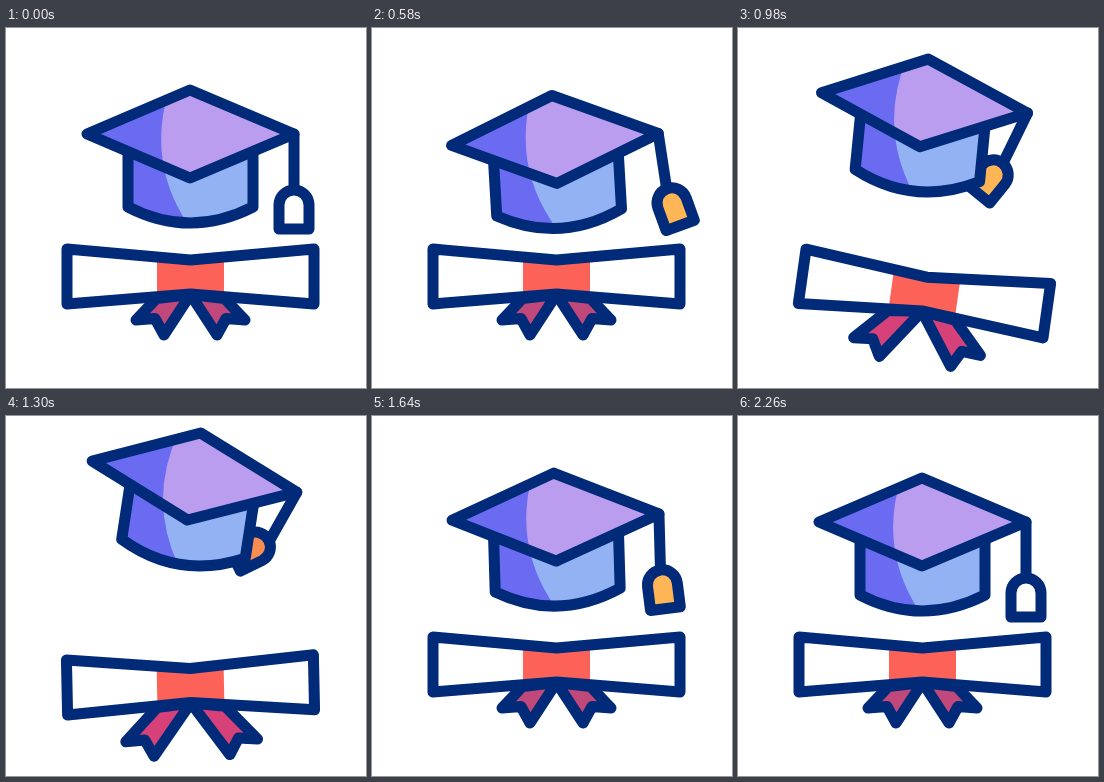
Recreate the animation shown at these times as an HTML page. Size 360x360 px, loop 2.4 s.

```html
<!DOCTYPE html>
<html lang="en">
<head>
<meta charset="utf-8">
<title>Graduation cap and diploma</title>
<style>
  html, body { margin: 0; width: 100%; height: 100%; overflow: hidden; background: #fff; }
  svg { display: block; width: 100vw; height: 100vh; }
  .line { fill: none; stroke: #012a78; stroke-width: 11; stroke-linejoin: round; stroke-linecap: round; }
</style>
</head>
<body>
<svg viewBox="0 0 360 360">
  <defs>
    <path id="board" d="M81 106L184 62L288 106L184 150Z"/>
    <path id="body" d="M122 122V179Q184 211 247 179V122Z"/>
    <path id="paper" d="M-123.5 -27.5L0 -16.5L123.5 -27.5V27.5L0 17.5L-123.5 27.5Z"/>
    <path id="shade" d="M60 50H167Q137 130 183 198V215H60Z"/>
    <clipPath id="inBoard"><use href="#board"/></clipPath>
    <clipPath id="inBody"><use href="#body"/></clipPath>
    <clipPath id="inPaper"><use href="#paper"/></clipPath>
  </defs>

  <g id="scroll">
    <path class="line tail"/>
    <path class="line tail" transform="scale(-1 1)"/>
    <use href="#paper" fill="#fff"/>
    <rect x="-33.5" y="-30" width="67" height="60" fill="#fc6257" clip-path="url(#inPaper)"/>
    <use href="#paper" class="line"/>
  </g>

  <g id="cap">
    <g id="tassel">
      <path class="line" d="M288 106V160"/>
      <g id="tag">
        <path id="tagShape" class="line" d="M273 201V177A15 15 0 0 1 303 177V201Z"/>
        <path id="glint" fill="#fff" d="M284 172Q291 169 293 176L291 182L294 191Q288 195 284 190L287 182Z"/>
      </g>
    </g>
    <use href="#body" fill="#93b2f3"/>
    <use href="#shade" fill="#6b6bf2" clip-path="url(#inBody)"/>
    <use href="#body" class="line"/>
    <use href="#board" fill="#bb9df0"/>
    <use href="#shade" fill="#6b6bf2" clip-path="url(#inBoard)"/>
    <use href="#board" class="line"/>
  </g>
</svg>
<script>
const LOOP = 2400;
const $ = id => document.getElementById(id);
const tails = document.querySelectorAll('.tail');

// time, angle, dx, dy
const capKeys = [
  [0, 0, 0, 0], [220, 0, 0, 0], [380, -1.9, -1, 3.5], [560, -3.3, -1.6, 5.5],
  [760, -2.2, -1, -2], [980, 5.6, 2, -31], [1190, 9.2, 4, -49], [1300, 8.7, 4, -45.5],
  [1480, 2.8, 1.2, -24], [1640, -1.7, -1, -5], [1820, -3.2, -1.6, 4],
  [2040, -1.5, -.6, 2], [2240, 0, 0, 0], [LOOP, 0, 0, 0]
];
// time, string angle, tag angle
const tasselKeys = [
  [0, 0, 0], [220, 0, 0], [380, -1.5, -8], [550, -9, -20], [760, 2, -12],
  [980, 26, 39], [1140, 30, 57], [1300, 29.5, 64], [1480, 14, 30], [1640, -1.5, -7],
  [1830, -9, -20], [2040, -4, -8], [2240, 0, 0], [LOOP, 0, 0]
];
// time, angle, dx, dy, tail extension
const scrollKeys = [
  [0, 0, 0, 0, 0], [580, 0, 0, 0, 0], [760, 5.1, 1.2, 4.5, .25], [980, 8, 2, 17, 1],
  [1140, 4, 1, 24, 1.3], [1300, -1.2, 0, 20.5, 1.2], [1480, -1.6, 0, 8, .5],
  [1640, 0, 0, 0, 0], [LOOP, 0, 0, 0, 0]
];

// Smooth curve through the keys, flat at every extreme.
function sample(keys, t) {
  const i = keys.findIndex((k, n) => t < keys[n + 1][0]);
  const a = keys[i], b = keys[i + 1], h = b[0] - a[0], u = (t - a[0]) / h;
  const slope = (n, c) => {
    const p = keys[n - 1], k = keys[n], q = keys[n + 1];
    if (!p || !q || (k[c] - p[c]) * (q[c] - k[c]) <= 0) return 0;
    return (q[c] - p[c]) / (q[0] - p[0]);
  };
  return a.slice(1).map((v, n) => {
    const c = n + 1, w = 1 - u;
    return v * w * w * (1 + 2 * u) + b[c] * u * u * (3 - 2 * u)
      + h * u * w * (slope(i, c) * w - slope(i + 1, c) * u);
  });
}

const set = (el, name, value) => el.setAttribute(name, value);
const mix = (a, b, k) => `rgb(${a.map((v, i) => Math.round(v + (b[i] - v) * k))})`;

function draw(now) {
  const t = now % LOOP;

  const [capAngle, cx, cy] = sample(capKeys, t);
  set($('cap'), 'transform', `translate(${cx} ${cy}) rotate(${capAngle} 184.5 106)`);

  const [string, tag] = sample(tasselKeys, t);
  set($('tassel'), 'transform', `rotate(${string - capAngle} 288 106)`);
  set($('tag'), 'transform', `rotate(${tag - string} 288 161)`);
  const warm = Math.max(0, 1 - Math.abs(t - 1300) / 220);
  const filled = t >= 240 && t < 2260;
  $('tagShape').style.fill = filled ? mix([253, 181, 85], [249, 141, 82], warm) : '#fff';
  $('glint').style.display = filled && t < 480 ? '' : 'none';

  const [angle, sx, sy, ext] = sample(scrollKeys, t);
  set($('scroll'), 'transform', `translate(${184.5 + sx} ${248.5 + sy}) rotate(${angle})`);
  const out = (x, y) => `L${-x - 9.5 * ext} ${y + 10 * ext}`;
  const shape = `M-34 22${out(54.5, 43.5)}${out(35.5, 42)}${out(26.5, 58.5)}L0 18Z`;
  for (const tail of tails) {
    set(tail, 'd', shape);
    tail.style.fill = mix([192, 72, 122], [214, 65, 122], Math.min(1, ext));
  }
}

function frame() {
  draw(performance.now());
  requestAnimationFrame(frame);
}
frame();
</script>
</body>
</html>
```
